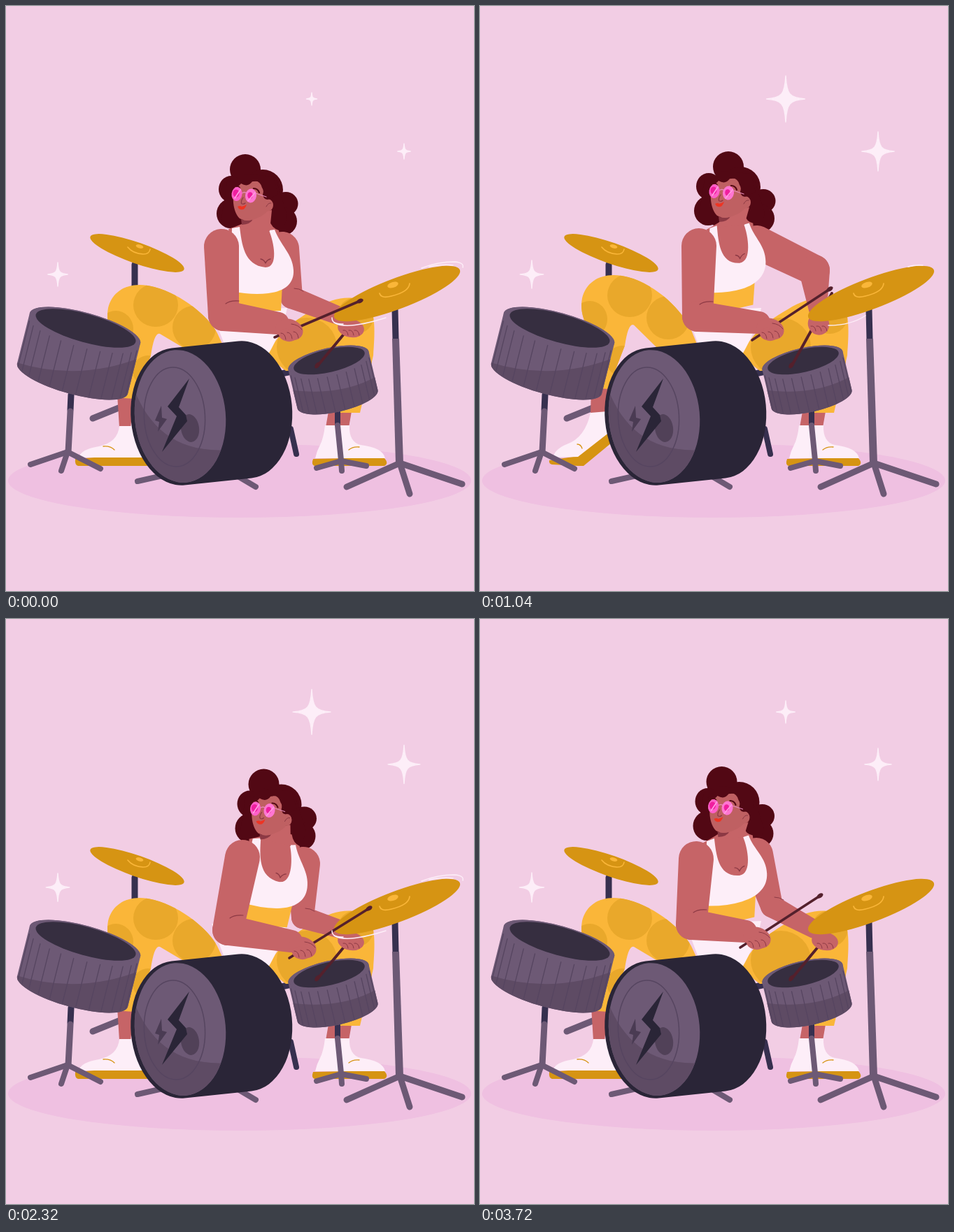
An HTML page with a canvas for the animation above (3760 ms loop, 669 px wide and 837 px high).

```html
<!DOCTYPE html>
<html lang="en">
<head>
<meta charset="utf-8">
<title>Drummer</title>
<style>
html, body { margin: 0; width: 100%; height: 100%; overflow: hidden; background: #f2cde4; }
canvas { display: block; }
</style>
</head>
<body>
<canvas id="stage" width="669" height="837"></canvas>
<script>
const ctx = document.getElementById('stage').getContext('2d');
const LOOP = 3760, SWAY = LOOP / 4, BEAT = LOOP / 8, TWINKLE = LOOP / 3, TAU = Math.PI * 2;
const C = {
  bg: '#f2cde4', floor: '#efc0e1', skin: '#c66467', face: '#bf6062', line: '#8c3944',
  hair: '#520814', white: '#fdeef8', yellow: '#fab639', spot: '#e9a82b', gold: '#d69413',
  metal: '#6d5975', shade: '#5e4b64', groove: '#564560', dark: '#2a2537', navy: '#37304f',
  head: '#362e40', stick: '#54202c'
};

// Pose: head offset, bun shift, straps, elbow, hand, stick, far elbow
const hit = { head: [0, 0], bun: [0], L: [329, 317], R: [381, 320], elbow: [311, 443],
  hand: [406, 463], butt: [384, 474], tip: [506, 422], far: [408, 417], raise: [0] };
const hitWide = { ...hit, far: [417, 415] };
const up = { ...hit, head: [13, -7], bun: [8], L: [340, 312], R: [391, 310], elbow: [319, 452],
  hand: [413, 450], butt: [395, 465], tip: [501, 384], far: [417, 415] };
const wind = { ...hit, head: [5, -4], bun: [8], L: [334, 316], R: [382, 311], elbow: [311, 444],
  hand: [416, 462], butt: [389, 478], tip: [500, 405], far: [478, 378], raise: [1] };
const low = { ...up, L: [341, 312], R: [390, 310], elbow: [318, 437],
  hand: [416, 473], butt: [398, 490], tip: [489, 391], far: [413, 415] };
const right = { ...hit, head: [26.5, 2.5], L: [359, 314], R: [411, 323], elbow: [317, 445],
  hand: [425, 470], butt: [405, 485], tip: [519, 414], far: [424, 427] };
const left = { ...hit, head: [3.5, -1], L: [330, 316], R: [381, 310], elbow: [302, 437],
  hand: [397, 456], butt: [372, 470], tip: [486, 396], far: [417, 411] };
const sway = [[0, hit], [60, hitWide], [100, wind], [320, up], [440, right], [580, low], [900, left], [SWAY, hit]];

const mix = (a, b, k) => a + (b - a) * k;
const ease = k => k * k * (3 - 2 * k);
const clamp = k => Math.max(0, Math.min(1, k));

function segment(keys, t) {
  let i = 0;
  while (i < keys.length - 2 && t >= keys[i + 1][0]) i++;
  const [t0, a] = keys[i], [t1, b] = keys[i + 1];
  return [a, b, clamp((t - t0) / (t1 - t0))];
}
function poseAt(t) {
  const [a, b, k] = segment(sway, t % SWAY), e = ease(k), pose = {};
  for (const name in a) pose[name] = a[name].map((v, i) => mix(v, b[name][i], e));
  return pose;
}
function valueAt(keys, t) { const [a, b, k] = segment(keys, t); return mix(a, b, k); }

function fill(d, color) { ctx.fillStyle = color; ctx.fill(new Path2D(d)); }
function stroke(d, color, width = 1.3) {
  ctx.strokeStyle = color; ctx.lineWidth = width; ctx.stroke(new Path2D(d));
}
function bar(x0, y0, x1, y1, width, color = C.metal) {
  stroke(`M${x0} ${y0}L${x1} ${y1}`, color, width);
}
function oval(x, y, rx, ry, color, deg = 0) {
  ctx.beginPath(); ctx.ellipse(x, y, rx, ry, deg * Math.PI / 180, 0, TAU);
  ctx.fillStyle = color; ctx.fill();
}
function poly(points, color) { fill('M' + points.map(p => p.join(' ')).join('L') + 'Z', color); }
function tripod(x, y, feet, width) { feet.forEach(([fx, fy]) => bar(x, y, fx, fy, width)); }

// Outline around two circles
function limb([x0, y0], r0, [x1, y1], r1, color = C.skin) {
  const a = Math.atan2(y1 - y0, x1 - x0);
  const s = Math.acos((r0 - r1) / Math.hypot(x1 - x0, y1 - y0)) || 0;
  ctx.beginPath();
  ctx.arc(x0, y0, r0, a + s, a - s + TAU);
  ctx.arc(x1, y1, r1, a - s, a + s);
  ctx.fillStyle = color; ctx.fill();
}

// Ellipse swept along (dx, dy)
function sweep(x, y, a, b, deg, dx, dy) {
  const rot = deg * Math.PI / 180, c = Math.cos(rot), s = Math.sin(rot);
  const ang = Math.atan2((dx * c + dy * s) / a, -(-dx * s + dy * c) / b);
  const path = new Path2D();
  path.ellipse(x, y, a, b, rot, ang, ang + Math.PI);
  path.ellipse(x + dx, y + dy, a, b, rot, ang + Math.PI, ang + TAU);
  path.closePath();
  const at = k => {
    const q = ang + Math.PI * (1 + k), u = a * Math.cos(q), v = b * Math.sin(q);
    return [x + u * c - v * s, y + u * s + v * c];
  };
  return { path, at };
}
function tom(x, y, a, b, deg, dx, dy, inset, shadow) {
  const body = sweep(x, y, a, b, deg, dx, dy);
  ctx.fillStyle = C.metal; ctx.fill(body.path);
  ctx.save();
  ctx.clip(body.path);
  fill(shadow, C.shade);
  ctx.restore();
  for (let i = 1; i < 13; i++) {
    const [px, py] = body.at(i / 13);
    bar(px + dx * .08, py + dy * .08, px + dx * .97, py + dy * .97, 1.3, C.groove);
  }
  oval(x, y, a, b, C.metal, deg);
  oval(x + 1, y, a - inset, b - 1.7, C.head, deg);
}

function star(x, y, h) {
  const w = h * .83;
  const ray = (sx, sy) => [[.05 * sx, .2 * sy], [.2 * sx, .05 * sy]];
  const pt = ([px, py]) => `${x + px * w} ${y + py * h}`;
  const arm = (sx, sy, end, flip) => {
    const c = ray(sx, sy);
    if (flip) c.reverse();
    return `C${pt(c[0])} ${pt(c[1])} ${pt(end)}`;
  };
  const d = `M${pt([0, -1])}` + arm(1, -1, [1, 0]) + arm(1, 1, [0, 1], true) +
    arm(-1, 1, [-1, 0]) + arm(-1, -1, [0, -1], true) + 'Z';
  fill(d, C.white);
  stroke(d, C.white, 1.5);
}
function stars(t) {
  const p = t % TWINKLE;
  star(437, 133, valueAt([[0, 9], [100, 5], [330, 5], [373, 9], [560, 28], [760, 41],
    [900, 41], [1040, 33], [1080, 32], [1213, 16], [1254, 9]], p));
  star(569, 208, valueAt([[0, 11], [110, 4], [390, 4], [760, 26], [1050, 28], [1213, 23], [1254, 11]], p));
  star(74, 384, valueAt([[0, 17], [200, 4], [390, 4], [800, 22], [1050, 20], [1213, 21], [1254, 17]], p));
}

function leftLeg(u) {
  const y = -14 * u, m = (flat, bent) => mix(flat, bent, u);
  poly([[159, 555 - 12 * u], [184, 555 - 12 * u], [m(178, 180), m(603, 585)], [m(162, 158), m(603, 585)]], C.skin);
  fill(`M99 ${m(648, 650)}L140 ${m(645, 644)}L${m(203, 188)} ${m(645, 606)}Q${m(209, 192)} ${m(652, 616)} ${m(203, 188)} ${m(658, 625)}` +
    `L${m(150, 148)} 658Q${m(145, 143)} 658 140 658L103 ${m(658, 656)}Q98 ${m(657, 655)} 99 ${m(648, 650)}Z`, C.gold);
  fill(`M${m(162, 158)} ${m(601, 582)}L182 ${m(601, 580)}L${m(205, 190)} ${m(646, 606)}L140 ${m(646, 645)}L104 646` +
    `Q107 634 ${m(133, 124)} ${m(630, 627)}Q${m(160, 150)} ${m(624, 618)} ${m(162, 158)} ${m(601, 582)}Z`, C.white);
  stroke(`M139 ${m(630, 627)}Q${m(149, 144)} ${m(629, 627)} ${m(155, 146)} ${m(635, 633)}`, C.gold);
  spots(`M316 498L302 ${468 + y * .3}C290 ${445 + y * .6} 253 ${413 + y} 212 ${402 + y}C180 ${393 + y} 153 ${404 + y} 146 ${432 + y}` +
    `C141 ${460 + y} 157 ${475 + y} 163 ${500 + y}L155 ${560 + y}L183 ${562 + y}L207 ${500 + y}` +
    `Q212 ${466 + y} 220 ${469 + y * .9}L252 488Z`,
    [[214, 428 + y, 32, 31], [157, 462 + y, 25, 26], [269, 460 + y, 31], [153, 399 + y, 18, 9], [203, 522 + y, 22]]);
}

function spots(d, list) {
  fill(d, C.yellow);
  ctx.save();
  ctx.clip(new Path2D(d));
  list.forEach(([x, y, rx, ry = rx]) => oval(x, y, rx, ry, C.spot));
  ctx.restore();
}

function rightLeg() {
  poly([[461, 580], [494, 580], [490, 603], [457, 603]], C.skin);
  fill('M439 648L540 646Q548 654 541 658L441 658Q436 656 439 648Z', C.gold);
  fill('M456 600L491 600Q490 624 507 628Q539 632 542 647L442 647Q444 637 449 628Q454 618 456 600Z', C.white);
  stroke('M490 635Q496 630 505 631', C.gold);
  spots('M372 500C384 478 402 455 440 434C468 416 497 413 514 424C530 435 527 470 525 500L506 582L453 582L452 520L400 522Z',
    [[430, 488, 43, 42], [500, 443, 26], [505, 530, 28], [398, 455, 12], [455, 585, 18]]);
}

function basis(p) {
  const H = [345, 480];
  const cols = (L, R) => [L[0] - H[0], L[1] - H[1], R[0] - H[0], R[1] - H[1]];
  return new DOMMatrix([...cols(p.L, p.R), ...H])
    .multiply(new DOMMatrix([...cols(hit.L, hit.R), 0, 0]).inverse()).translate(-H[0], -H[1]);
}

function farArm(p) {
  const r = p.raise[0], wrist = [478 + 5 * r, 444 - 10 * r];
  limb([p.R[0] + 14, p.R[1] + 27], 24, p.far, mix(16, 22, r));
  limb(p.far, mix(16, 22, r), wrist, 13);
  if (r < .6) stroke(`M${p.far[0] + 4} ${p.far[1] - 13}q7 0 13 4`, C.line, 1);
  const x = 493 - 9 * r, y = 461 - 6 * r;
  bar(490 + 13 * r, 461 - 50 * r, 446, 514, 4, C.stick);
  oval(445, 514, 3, 5, C.stick, 35);
  oval(x, y, 19 - 3 * r, 13 + 2 * r, C.skin, 10 + 50 * r);
  for (let i = 0; i < 3; i++) stroke(`M${x - 11 + i * 8} ${y + 3}q6 -1 7 7`, C.line, 1);
}

function torso(p) {
  const [hx, hy] = p.head, m = basis(p);
  fill('M294 436L402 432Q396 462 374 500L318 500Z', C.white);
  ctx.save();
  ctx.transform(m.a, m.b, m.c, m.d, m.e, m.f);
  fill('M318 319Q340 312 347 306L376 306Q380 318 390 321L396 372L330 378Z', C.skin);
  fill('M322 400L395 398L393 436L318 440Z', C.yellow);
  fill('M323 318L334 316C337 340 340 371 371 374C390 374 383 338 376 321L384 320C392 342 410 355 411 378' +
    'C412 396 400 408 375 411Q352 414 322 408L321 380Z', C.white);
  stroke('M364 362Q369 363 371 368Q373 363 378 362', C.line);
  ctx.restore();
  poly([[343 + hx, 298 + hy], [380 + hx, 292 + hy], [p.R[0] - 4, p.R[1] + 2], [p.L[0] + 6, p.L[1] + 1]], C.skin);
}

function hairBack(hx, hy, bun) {
  ctx.save(); ctx.translate(hx, hy);
  oval(342 + bun, 234, 22, 22, C.hair);
  oval(367, 263, 29, 29, C.hair);
  oval(322, 262, 18, 19, C.hair);
  oval(321, 297, 20, 21, C.hair);
  oval(400, 283, 17.5, 17, C.hair);
  oval(396, 308, 20, 20, C.hair);
  fill('M316 252L385 245L402 300Q398 328 377 321L330 318L307 310Z', C.hair);
  ctx.restore();
}
function head(hx, hy) {
  ctx.save(); ctx.translate(hx, hy);
  fill('M336 305Q345 309 353 305Q350 312 337 313Z', C.line);
  fill('M329 254C322 272 324 294 334 304Q345 310 358 304Q371 299 375 291L372 268L362 250Z', C.face);
  oval(375, 285, 7, 8.5, C.face);
  stroke('M372 287q3 -6 7 -5', C.line, 1);
  fill('M321 258Q330 262 336 254Q346 260 352 251Q363 248 366 260Q369 264 367 270Q369 279 376 276L389 270L382 244L340 240Z', C.hair);
  stroke('M354 261Q360 261 362 267', C.hair, 2.2);
  stroke('M329 258Q332 257 334 260', C.hair, 1.8);
  stroke('M339 274Q335 280 337 283Q340 284 342 282', C.line);
  stroke('M337 268Q341 265 344 268M357 268L372 273', '#e58ab7', 1.3);
  oval(330, 269, 7.5, 10, '#ff5fc9', 8);
  oval(350, 271.5, 8, 10, '#ff76d2', 8);
  oval(329, 268, 4.5, 5.5, '#f01f9f');
  oval(349, 271, 3.8, 4.8, '#f01f9f');
  stroke('M327 275L335 263M346 279L356 267', '#ff9be0', 1.8);
  fill('M331 287Q335 285 337 287Q341 286 344 284Q341 293 335 291Q332 290 331 287Z', '#ee3423');
  ctx.restore();
}

function nearArm(p) {
  const [x, y] = p.hand, [ex, ey] = p.elbow;
  limb([p.L[0] - 21, p.L[1] + 27], 25, p.elbow, 22);
  limb(p.elbow, 22, [x - 17, y - 9], 16);
  stroke(`M${ex + 3} ${ey - 17}q6 -5 19 -4`, C.line, 1.1);
  bar(...p.butt, ...p.tip, 3.6, C.stick);
  const angle = Math.atan2(p.tip[1] - p.butt[1], p.tip[0] - p.butt[0]) * 180 / Math.PI;
  oval(...p.tip, 5, 3, C.stick, angle);
  oval(x - 1, y, 20, 15, C.skin, 18);
  oval(x - 3, y + 8, 13, 9, C.skin, 10);
  for (let i = 0; i < 3; i++) stroke(`M${x - 13 + i * 9} ${y + 5 - i}q6 0 7 9`, C.line, 1);
  stroke(`M${x + 2} ${y - 8}q10 1 15 8`, C.line, 1);
}

function backKit() {
  oval(334, 679, 331, 53, C.floor);
  bar(124, 590, 166, 573, 9);
  bar(184, 370, 184, 410, 9, C.navy);
  oval(187.5, 353.5, 71, 15, C.gold, 19.3);
  oval(191, 344, 5.5, 2.6, C.yellow, 15);
  stroke('M174 345Q181 354 196 355Q205 355 206 348', C.yellow, 1.6);
  bar(407, 605, 415, 641, 8, C.navy);
  bar(394, 526, 408, 523, 9, C.navy);
}
function leftTom() {
  bar(93, 556, 92, 578, 9, C.navy);
  bar(92, 580, 89, 638, 9);
  tripod(88, 638, [[35, 656], [79, 665], [135, 662]], 8);
  tom(113, 461, 82, 22, 15.5, -18, 72, 8, 'M0 505Q100 542 200 500L200 600L0 600Z');
}
function snare() {
  bar(474, 575, 474, 597, 8, C.navy);
  bar(474, 600, 479, 650, 8);
  tripod(479, 651, [[444, 661], [480, 665], [515, 658]], 8);
  tom(461, 507.5, 59, 18, -13, 13, 55, 7, 'M400 548Q480 562 540 524L540 600L400 600Z');
}
function rightCymbal() {
  bar(556, 434, 557, 476, 9, C.navy);
  poly([[552, 476], [562, 476], [568, 654], [557, 654]], C.metal);
  tripod(563, 654, [[487, 688], [577, 698], [652, 684]], 9);
  oval(559, 411.5, 96, 22, C.gold, -20.7);
  oval(553, 399, 8, 4, C.yellow, -18);
  stroke('M534 411Q536 419 551 415Q576 409 577 397', C.yellow, 1.7);
}
function bassDrum(scale) {
  bar(188, 680, 228, 671, 8);
  bar(325, 669, 357, 688, 8);
  ctx.save();
  ctx.translate(294, 583); ctx.scale(scale, scale); ctx.translate(-294, -583);
  ctx.fillStyle = C.dark;
  ctx.fill(sweep(246, 587.5, 67.5, 98.5, -5, 95.5, -10).path);
  oval(249, 587, 65, 95, C.metal, -5);
  ctx.save();
  ctx.clip();
  fill('M178 535C200 600 240 640 318 635L318 690L178 690Z', C.shade);
  ctx.restore();
  ctx.beginPath(); ctx.ellipse(241, 588, 43.5, 71, -.05, 0, TAU);
  ctx.strokeStyle = C.groove; ctx.lineWidth = 1.5; ctx.stroke();
  oval(263, 604, 13, 20, '#514158', -8);
  fill('M222 572L213 593L219 595L217 609L230 591L223 589Z', '#4a3b53');
  fill('M262 533L231 573L244 587L223 638L259 594L257 585L247 574Z', C.dark);
  ctx.restore();
}

function effects(t) {
  const ring = (t + 35) % BEAT, p = t % SWAY;
  if (ring < 110) {
    stroke('M594 375Q617 366 641 366Q655 367 653 374M605 373Q625 369 639 371', C.white, 1.5);
    stroke('M466 446Q466 456 482 455M469 453Q486 464 543 446', C.white, 1.5);
  } else if (ring < 400) {
    stroke('M612 373Q622 370 633 371M498 457Q530 457 551 443', C.white, 1.5);
  }
  if (p > 550 && p < 630)
    stroke('M420 494L427 501M430 479L434 488M450 477L452 485M489 478L486 484M518 486L529 480M521 507L528 506M394 515L404 512', C.white, 1.5);
}

function draw(now) {
  const t = Math.floor((now % LOOP) / 40) * 40;
  const p = poseAt(t), beat = t % BEAT;
  const lift = ease(clamp((beat - 60) / 40) * clamp((290 - beat) / 90));
  const kick = clamp(1 - Math.abs(beat - 60) / 40);
  ctx.lineCap = ctx.lineJoin = 'round';
  ctx.fillStyle = C.bg; ctx.fillRect(0, 0, 669, 837);
  stars(t);
  backKit();
  leftLeg(lift);
  rightLeg();
  snare();
  hairBack(...p.head, p.bun[0]);
  farArm(p);
  torso(p);
  head(...p.head);
  rightCymbal();
  nearArm(p);
  leftTom();
  bassDrum(1 + .016 * kick);
  effects(t);
}
function frame() {
  draw(performance.now());
  requestAnimationFrame(frame);
}
frame();
</script>
</body>
</html>
```
